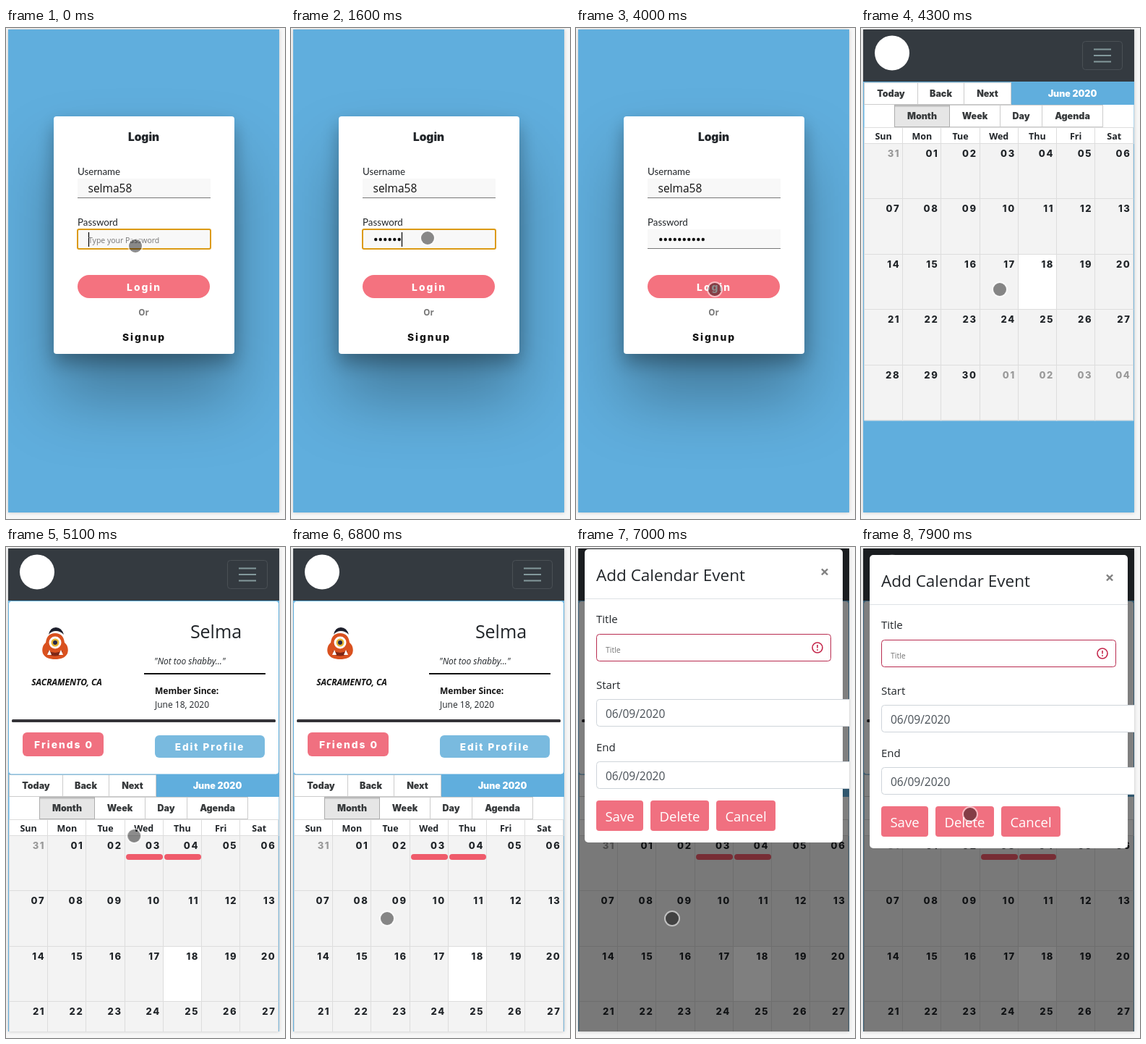
An HTML page for the animation above (8 s loop, 386x678 px).

```html
<!DOCTYPE html>
<html lang="en">
<head>
<meta charset="utf-8">
<title>Calendar login</title>
<style>
html, body { margin: 0; width: 100%; height: 100%; overflow: hidden; background: #f7f7f7; }
svg { display: block; width: 386px; height: 678px; font: 12.5px "Open Sans", "Noto Sans", sans-serif; fill: #212529; }
.mid { text-anchor: middle; }
.b { font-weight: 700; }
.i { font-style: italic; }
.w { fill: #fff; }
.label { font: 13.3px Lato, sans-serif; }
.heavy { font: 900 12.5px Inter, sans-serif; }
.wide { font: 800 13.8px Inter, sans-serif; letter-spacing: 2px; }
.date { font: 800 13px Inter, sans-serif; letter-spacing: 1.6px; text-anchor: end; }
.pink { fill: #f07080; }
.blue { fill: #60aedd; }
.field { fill: #f8f8f8; }
.line { stroke: #777; }
.btn { fill: #fff; stroke: #ccc; }
.form { font-size: 15px; }
.value { font-size: 15.5px; fill: #495057; }
.box { fill: #fff; stroke: #ced4da; }
.action { font-size: 18.5px; fill: #fff; text-anchor: middle; }

/* One shared 8 s clock; the small lead keeps changes on their beat. */
.t { animation: 8s step-end -10ms infinite; }
.login { animation-name: leave; }
.app { animation-name: enter; }
.focus { animation-name: blur; }
.hint { animation-name: hint; }
.typed { animation-name: type; }
.caret { animation-name: blink; }
.profile { animation-name: profile; }
.month { animation-name: push; }
.events { animation-name: events; }
.avatar { animation-name: avatar; }
.shade { animation-name: shade; }
.modal { animation-name: modal; }
.touch { animation-name: touch; }

@keyframes leave { 0% { opacity: 1 } 52.5%, 100% { opacity: 0 } }
@keyframes enter { 0% { opacity: 0 } 52.5%, 100% { opacity: 1 } }
@keyframes blur { 0% { opacity: 1 } 48.75%, 100% { opacity: 0 } }
@keyframes hint { 0% { opacity: 1 } 6.25%, 100% { opacity: 0 } }
@keyframes profile { 0% { opacity: 0 } 55%, 100% { opacity: 1 } }
@keyframes events { 0% { opacity: 0 } 57.5%, 100% { opacity: 1 } }
@keyframes avatar { 0% { opacity: 0 } 62.5%, 100% { opacity: 1 } }
@keyframes push { 0% { transform: none } 55%, 100% { transform: translateY(239px) } }
@keyframes blink {
  0% { opacity: 1 } 33.75% { opacity: 0 } 40% { opacity: 1 } 46.25%, 100% { opacity: 0 }
}
@keyframes type {
  0% { transform: translateX(0) }
  6.25% { transform: translateX(6.5px) }
  7.5% { transform: translateX(13px) }
  12.5% { transform: translateX(19.5px) }
  16.25% { transform: translateX(26px) }
  17.5% { transform: translateX(32.5px) }
  20% { transform: translateX(39px) }
  23.75% { transform: translateX(45.5px) }
  25% { transform: translateX(52px) }
  26.25% { transform: translateX(58.5px) }
  27.5%, 100% { transform: translateX(65px) }
}
@keyframes shade { 0% { opacity: 0 } 86.25% { opacity: .33 } 87.5%, 100% { opacity: .5 } }
@keyframes modal {
  0% { opacity: 0; transform: translateY(-50px) }
  86.25% { opacity: .67; transform: translateY(-25px) }
  87.5% { opacity: 1; transform: translateY(-8px) }
  88.75%, 100% { opacity: 1; transform: none }
}
@keyframes touch {
  0% { transform: translate(179px, 301px) }
  3.75% { transform: translate(179px, 301px); animation-timing-function: steps(4, jump-start) }
  8.75% { transform: translate(189px, 290px) }
  33.75% { transform: translate(189px, 290px); animation-timing-function: steps(6, jump-start) }
  41.25% { transform: translate(193px, 385px) }
  45% { transform: translate(193px, 385px); animation-timing-function: steps(5, jump-start) }
  51.25% { transform: translate(192px, 361px) }
  62.5% { transform: translate(192px, 361px); animation-timing-function: steps(8, jump-start) }
  72.5% { transform: translate(133px, 513px) }
  97.5% { transform: translate(133px, 513px); animation-timing-function: steps(2, jump-start) }
  100% { transform: translate(151px, 369px) }
}
</style>
</head>
<body>
<svg viewBox="0 0 386 678">
  <clipPath id="screen"><rect x="3" y="2" width="375" height="667"/></clipPath>
  <rect x="3" y="2" width="375" height="667" fill="#0003" style="filter:blur(2.5px)"/>

  <g clip-path="url(#screen)">
    <rect class="blue" x="3" y="2" width="375" height="667"/>

    <g class="t login">
      <rect x="66" y="182" width="250" height="328" fill="#0000004d" style="filter:blur(45px)"/>
      <rect x="66" y="134" width="250" height="328" fill="#0000004d" style="filter:blur(13px)"/>
      <rect class="w" x="66" y="122" width="250" height="328" rx="4"/>
      <text class="heavy mid" x="190.5" y="156" style="font-size:15.5px">Login</text>

      <text class="label" x="99" y="203">Username</text>
      <rect class="field" x="99" y="208" width="184" height="26"/>
      <path class="line" d="M99 234.5h184"/>
      <text x="113.5" y="227" style="font-size:15.5px" fill="#111">selma58</text>

      <text class="label" x="99" y="273">Password</text>
      <rect class="field" x="99" y="278" width="184" height="27"/>
      <path class="line" d="M99 304.5h184"/>
      <g id="dots" fill="#111"></g>
      <g class="t typed">
        <rect class="field" x="114" y="282" width="68" height="20"/>
        <path class="t caret" d="M114.5 282v20" stroke="#000" stroke-width="1.2"/>
      </g>
      <text class="t hint" x="114" y="297" style="font-size:10.5px" fill="#757575">Type your Password</text>
      <rect class="t focus" x="99" y="278" width="184" height="27" rx="2" fill="none" stroke="#dc9a14" stroke-width="2"/>

      <rect x="99" y="341" width="183" height="32" rx="16" fill="#f4727f"/>
      <text class="wide w mid" x="191" y="363">Login</text>
      <text class="b mid" x="190.5" y="397" style="font-size:11.5px" fill="#777">Or</text>
      <text class="wide mid" x="191" y="432" fill="#111">Signup</text>
    </g>

    <g class="t app">
      <rect x="3" y="2" width="375" height="72" fill="#343a40"/>
      <circle class="w" cx="43" cy="34.5" r="24"/>
      <rect x="306.5" y="18.5" width="55" height="39" rx="4" fill="none" stroke="#4a5055"/>
      <path d="M322 29.5h24M322 38h24M322 46.5h24" stroke="#83999c" stroke-width="2"/>

      <g class="t month">
        <rect class="w" x="4.5" y="106" width="373" height="54"/>
        <g id="bar"></g>
        <text class="heavy w mid" x="292.5" y="94.5">June 2020</text>
        <g id="grid"></g>
        <g class="t events" fill="#ef5b6b">
          <rect x="166" y="185" width="51" height="8" rx="4"/>
          <rect x="219" y="185" width="51" height="8" rx="4"/>
        </g>
      </g>

      <g class="t profile">
        <rect class="w" x="3.5" y="74.5" width="374" height="239.5" rx="4" stroke="#60aedd"/>
        <g class="t avatar">
          <path d="M59 121q2-10 10-10t11 10q-5-5-11-5t-10 5z" fill="#1d1f2c"/>
          <path d="M68 119c8 0 12 5 13 13 4 3 6 9 4 15-3 6-9 8-17 8s-14-2-17-8c-2-6 0-12 4-15 1-8 5-13 13-13z" fill="#d9511f"/>
          <circle class="w" cx="68" cy="132" r="8.5"/>
          <circle cx="68" cy="132" r="5.5" fill="#e5b532"/>
          <circle cx="68" cy="132" r="3" fill="#26294a"/>
          <path d="M58 143q10 6 20 0l-1 5q-9 5-18 0z" fill="#7d2716"/>
          <path class="w" d="M57 149l3-7 3 7zM73 149l3-7 3 7z"/>
        </g>
        <text class="b i mid" x="84" y="191" style="font-size:12px" fill="#111">SACRAMENTO, CA</text>
        <text class="mid" x="290.5" y="126" style="font-size:25px">Selma</text>
        <text class="i" x="205" y="162" style="font-size:12px">"Not too shabby..."</text>
        <path d="M191 175h168" stroke="#111" stroke-width="2"/>
        <text class="b" x="206" y="203" style="font-size:12px" fill="#111">Member Since:</text>
        <text x="206" y="222" style="font-size:12px">June 18, 2020</text>
        <rect x="8" y="238" width="365" height="4" rx="1.5" fill="#343338"/>
        <rect class="pink" x="23" y="256" width="112" height="33" rx="6"/>
        <text class="wide w mid" x="80" y="278">Friends 0</text>
        <rect x="206" y="260" width="152" height="31" rx="6" fill="#79badf"/>
        <text class="wide w mid" x="282" y="281" style="font-size:13.5px">Edit Profile</text>
      </g>

      <rect class="t shade" x="3" y="2" width="375" height="667" fill="#000"/>
      <g class="t modal">
        <rect class="w" x="12" y="11" width="357" height="405" rx="5"/>
        <text x="28" y="55" style="font-size:22.5px;font-weight:500">Add Calendar Event</text>
        <text class="b mid" x="344" y="50" style="font-size:22px" fill="#808080">×</text>
        <path d="M12 79.5h357" stroke="#dee2e6"/>
        <text class="form" x="28" y="113">Title</text>
        <rect x="28.5" y="128.5" width="324" height="37" rx="4" fill="#fff" stroke="#b92c50"/>
        <text x="41" y="154" style="font-size:10.5px" fill="#757575">Title</text>
        <g fill="none" stroke="#c4274b" stroke-width="1.6">
          <circle cx="334" cy="147" r="7"/>
          <path d="M334 143v4.6M334 149.3v1.8"/>
        </g>
        <text class="form" x="28" y="204">Start</text>
        <rect class="box" x="28.5" y="218.5" width="380" height="37" rx="4"/>
        <text class="value" x="41" y="244">06/09/2020</text>
        <text class="form" x="28" y="290">End</text>
        <rect class="box" x="28.5" y="304.5" width="380" height="37" rx="4"/>
        <text class="value" x="41" y="330">06/09/2020</text>
        <g class="pink">
          <rect x="28" y="358" width="65" height="42" rx="4"/>
          <rect x="103" y="358" width="81" height="42" rx="4"/>
          <rect x="194" y="358" width="82" height="42" rx="4"/>
        </g>
        <text class="action" x="60.5" y="387">Save</text>
        <text class="action" x="143.5" y="387">Delete</text>
        <text class="action" x="235" y="387">Cancel</text>
      </g>
    </g>

    <g class="t touch">
      <circle r="10" fill="none" stroke="#fff8" stroke-width="2"/>
      <circle r="9" fill="#00000073"/>
    </g>
  </g>
</svg>

<script>
const add = (id, markup) => document.getElementById(id).innerHTML += markup;
const text = (cls, x, y, s, fill = '') =>
  `<text class="${cls}" x="${x}" y="${y}"${fill && ` fill="${fill}"`}>${s}</text>`;

for (let i = 0; i < 10; i++) add('dots', `<circle cx="${117.25 + 6.5 * i}" cy="292" r="2.2"/>`);

function buttons(names, edges, y) {
  names.forEach((name, i) => {
    const x = edges[i], w = edges[i + 1] - x;
    add('bar', `<rect class="btn" x="${x}" y="${y}" width="${w}" height="30"/>` +
      text('heavy mid', x + w / 2, y + 19, name, '#373a3c'));
  });
}
buttons(['Today', 'Back', 'Next'], [4.5, 78.5, 142.5, 207.5], 75.5);
buttons(['Month', 'Week', 'Day', 'Agenda'], [46.5, 122.5, 192.5, 250.5, 334.5], 106.5);
add('bar', '<rect x="46.5" y="106.5" width="76" height="30" fill="#e6e6e6" stroke="#adadad"/>' +
  '<path d="M47 108h75" stroke="#0002" stroke-width="2"/>' +
  text('heavy mid', 84.5, 125.5, 'Month', '#373a3c'));

const left = 4.5, top0 = 159.5, cw = 53.2, ch = 76.4;
const snap = v => Math.floor(v) + .5;
let cells = '', lines = '';
'Sun Mon Tue Wed Thu Fri Sat'.split(' ').forEach((day, c) => {
  cells += text('b mid', left + cw * (c + .5), 153.5, day);
});
for (let n = 0; n < 35; n++) {
  const c = n % 7, r = Math.floor(n / 7), off = n < 1 || n > 30;
  const day = n < 1 ? 31 : (n - 1) % 30 + 1;
  const x = left + cw * c, y = top0 + ch * r;
  cells += `<rect x="${snap(x)}" y="${snap(y)}" width="${cw + .5}" height="${ch + .5}" fill="${n === 18 ? '#fff' : '#f3f3f3'}"/>`;
  cells += text('date', x + cw - 3.5, y + 18.5, String(day).padStart(2, '0'), off ? '#999' : '#212529');
}
for (let c = 0; c < 8; c++) lines += `M${snap(left + cw * c)} 137.5V541.5`;
for (let r = 0; r < 6; r++) lines += `M4.5 ${snap(top0 + ch * r)}H377`;
add('grid', cells + `<path d="M4.5 137.5H377${lines}" fill="none" stroke="#ddd"/>`);
</script>
</body>
</html>
```
